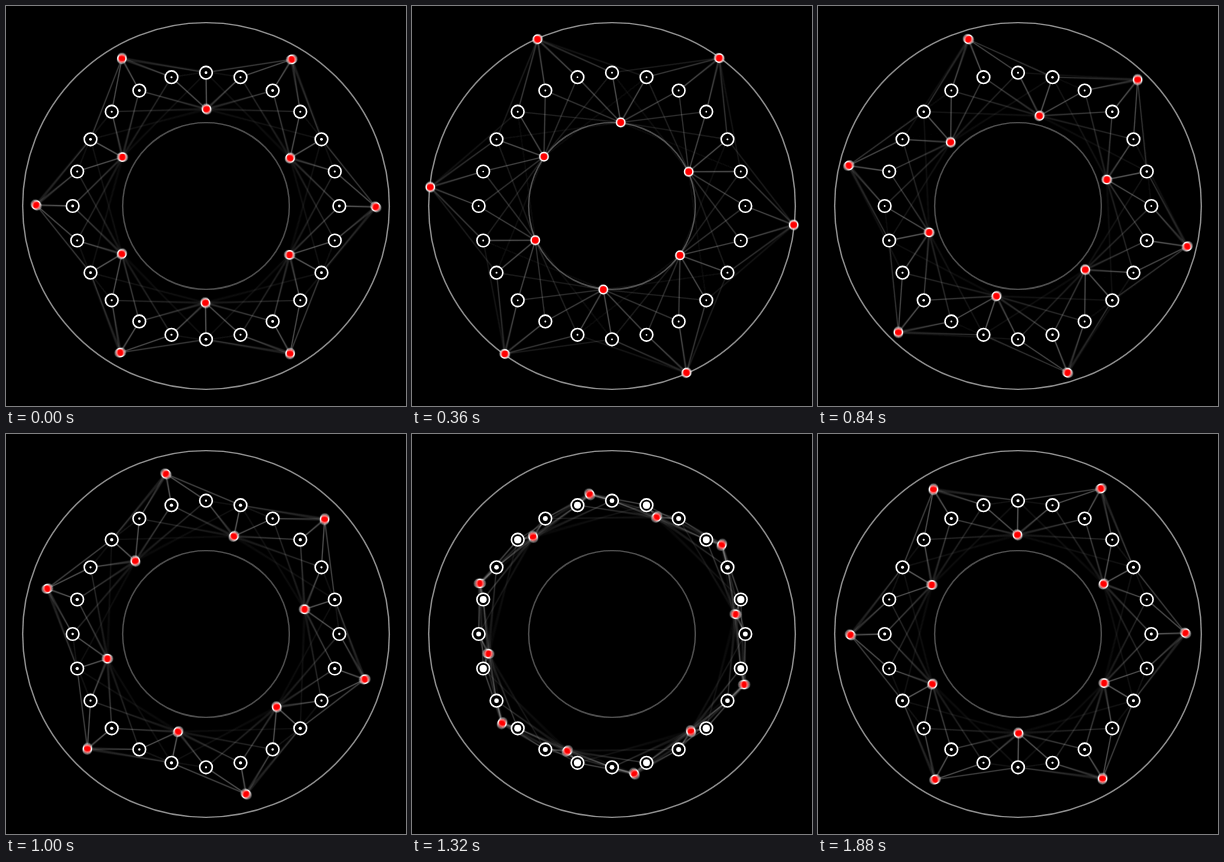
Animation of 400 by 400 pixels, one loop 1920 ms. Source, as an HTML page with a canvas:

```html
<!DOCTYPE html>
<html lang="en">
<head>
<meta charset="utf-8">
<title>Linked rings</title>
<style>
html, body { margin: 0; width: 100%; height: 100%; overflow: hidden; background: #000; }
canvas { display: block; width: 400px; height: 400px; }
</style>
</head>
<body>
<canvas id="stage" width="400" height="400"></canvas>
<script>
const SIZE = 400, STEP = 40, FRAMES = 48, SAMPLES = 5;
const MID = SIZE / 3, SWING = 50, REACH = 140;
const TAU = Math.PI * 2;

const out = document.getElementById('stage').getContext('2d');
const layer = document.createElement('canvas');
layer.width = layer.height = SIZE;
const ctx = layer.getContext('2d');

const polar = (r, a) => ({ x: r * Math.cos(a), y: r * Math.sin(a) });
const gap = (p, q) => Math.hypot(p.x - q.x, p.y - q.y);
const nodes = Array.from({ length: 24 }, (_, i) => polar(MID, i * TAU / 24));

function disc(p, r, fill, stroke, width) {
  ctx.beginPath();
  ctx.arc(p.x, p.y, r, 0, TAU);
  if (fill) {
    ctx.fillStyle = fill;
    ctx.fill();
  }
  if (stroke) {
    ctx.strokeStyle = stroke;
    ctx.lineWidth = width;
    ctx.stroke();
  }
}

function link(p, q) {
  const d = gap(p, q);
  if (d >= REACH) return;
  ctx.strokeStyle = `rgba(255,255,255,${0.43 * (1 - d / REACH)})`;
  ctx.lineWidth = 1.3;
  ctx.beginPath();
  ctx.moveTo(p.x, p.y);
  ctx.lineTo(q.x, q.y);
  ctx.stroke();
}

// u runs 0..1 over one loop, a twelfth of a turn
function scene(u) {
  const swing = SWING * Math.cos(Math.PI * (u - 0.25));
  const beads = Array.from({ length: 12 }, (_, i) =>
    polar(MID + (i % 2 ? -swing : swing), (i + u) * TAU / 12));

  ctx.setTransform(1, 0, 0, 1, 0, 0);
  ctx.fillStyle = '#000';
  ctx.fillRect(0, 0, SIZE, SIZE);
  ctx.translate(SIZE / 2, SIZE / 2);

  const centre = { x: 0, y: 0 };
  disc(centre, MID + SWING, null, '#919191', 1.4);
  disc(centre, MID - SWING, null, '#505050', 1.4);

  for (const b of beads) for (const n of nodes) link(b, n);

  for (const n of nodes) {
    const near = Math.min(...beads.map(b => gap(b, n)));
    disc(n, 6.3, '#000', '#fff', 1.6);
    disc(n, 3.5 * Math.pow(16.3 / near, 1.15), '#fff');
  }
  for (const b of beads) disc(b, 4.2, '#f00', '#fff', 1.5);
}

// Average several moments per step for motion blur
function render(frame) {
  out.globalCompositeOperation = 'source-over';
  out.globalAlpha = 1;
  out.fillStyle = '#000';
  out.fillRect(0, 0, SIZE, SIZE);
  out.globalCompositeOperation = 'lighter';
  out.globalAlpha = 1 / SAMPLES;
  for (let i = 0; i < SAMPLES; i++) {
    scene((frame + (i + 0.5) / SAMPLES) / FRAMES);
    out.drawImage(layer, 0, 0);
  }
}

const start = performance.now();
let last = 0;
function tick() {
  const t = Math.max(0, performance.now() - start);
  const frame = Math.floor(t / STEP) % FRAMES;
  if (frame !== last) render(last = frame);
  requestAnimationFrame(tick);
}
render(0);
requestAnimationFrame(tick);
</script>
</body>
</html>
```
